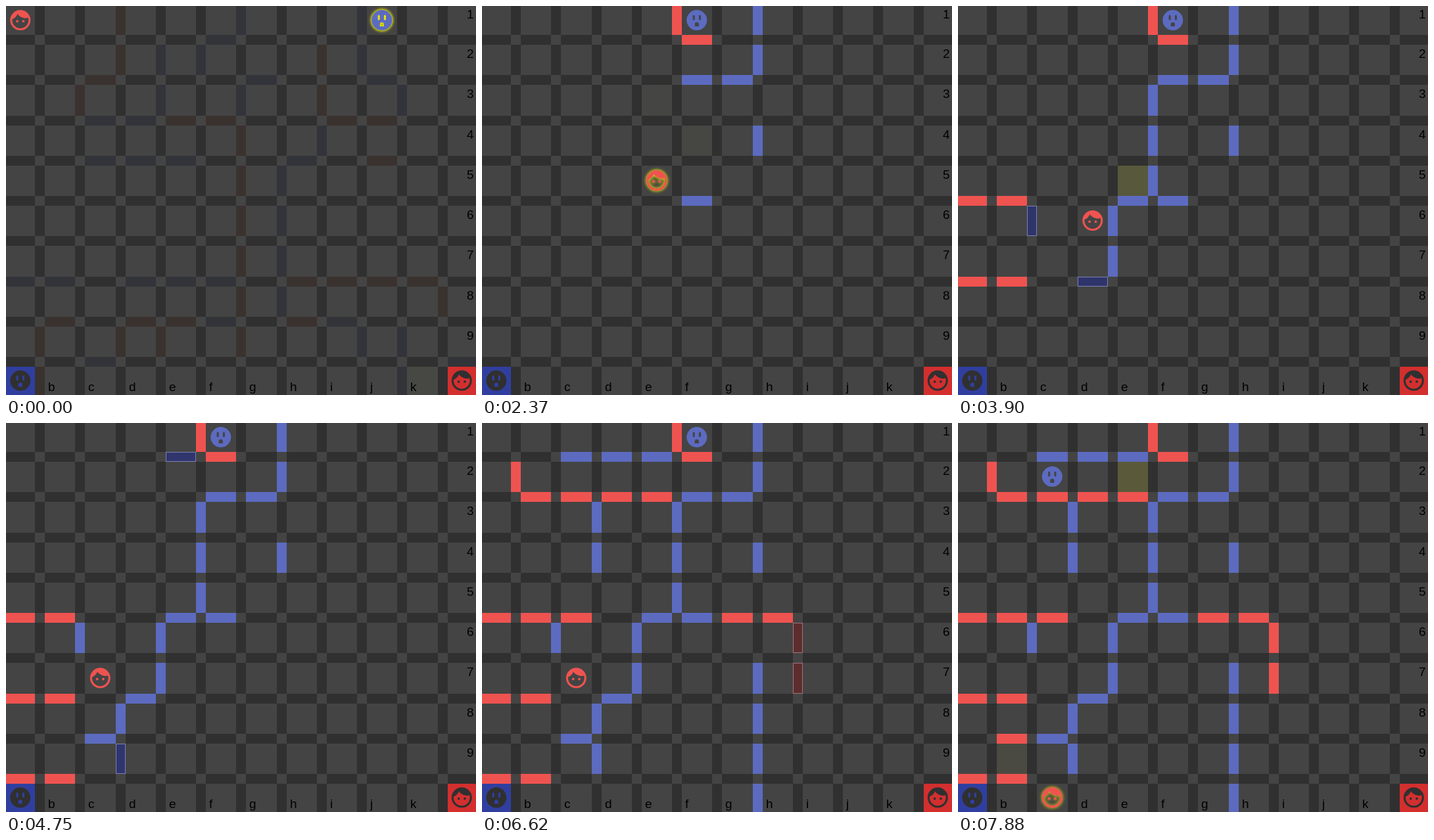
An HTML page with a canvas that plays this animation: 715x592 px, repeating every 8000 ms.

```html
<!DOCTYPE html>
<html>
<head>
<meta charset="utf-8">
<style>
html, body { margin: 0; width: 100%; height: 100%; overflow: hidden; background: #444; }
canvas { display: block; }
</style>
</head>
<body>
<canvas id="board" width="715" height="592"></canvas>
<script>
const ctx = document.getElementById('board').getContext('2d');
const LOOP = 8000, TURN = 210, FIRST = -10;
const COLS = 12, ROWS = 10;

// Turns alternate blue, red. "b2" is a move; "b2>" and "b2v" build a wall right of / below a cell.
const turns = `j1|b2|h1|d2|f1|e1> f1v|g1> g2>|e3|f2v g2v|f4|g4> f5v|e5|e3> e4>|a5v b5v|e5> e5v|
a7v b7v|d6> d7>|d6|b6> d7v|c7|c8> c8v|a9v b9v|c9> e1v|d2v e2v|c1v d1v|b2v c2v|c3> c4>|a2> c5v|
g7> g8>|g5v h5v|g9> g10>|h6> h7>|g2|b8|e2|b9 b8v|c2|c10`.split('|').map(s => s.trim().split(' '));

// Walls of the previous game, still fading at the start
const staleRed = `c1> c2> b3> h2> h3> f4> f5> f6> f7> f8> f9> k8> a9> a10> c9> d9> c2v e3v f3v i3v j3v j4v
h7v i7v j7v k7v b8v d8v e8v h8v`.split(/\s+/);
const staleBlue = `f1> d2> d3> e2> f3> i1> i2> j3> h4> g5> g6> g7> g8> i9> j9> j10> f1v g2v j2v c3v d3v
c4v d4v e4v h4v a7v b7v d7v e7v f7v f8v i8v c9v l9v`.split(/\s+/);

const sides = [
  { home: 'l1', bright: [92, 107, 192], dark: [47, 53, 107], edge: '150,155,205' },
  { home: 'a1', bright: [239, 83, 80], dark: [93, 45, 46], edge: '185,140,150' }
];

const outlet = new Path2D('M12 2a10 10 0 1 0 0 20a10 10 0 1 0 0-20z' +
  'M9 12c-.55 0-1-.45-1-1V8c0-.55.45-1 1-1s1 .45 1 1v3c0 .55-.45 1-1 1z' +
  'M15 12c-.55 0-1-.45-1-1V8c0-.55.45-1 1-1s1 .45 1 1v3c0 .55-.45 1-1 1z' +
  'M14 18h-4v-2a2 2 0 0 1 4 0z');
const face = new Path2D('M9 11.75a1.25 1.25 0 1 0 0 2.5a1.25 1.25 0 1 0 0-2.5z' +
  'M15 11.75a1.25 1.25 0 1 0 0 2.5a1.25 1.25 0 1 0 0-2.5z' +
  'M12 2a10 10 0 1 0 0 20a10 10 0 1 0 0-20z' +
  'M12 20c-4.41 0-8-3.59-8-8 0-.29.02-.58.05-.86 2.36-1.05 4.23-2.98 5.21-5.37' +
  'C11.07 8.33 14.05 10 17.42 10c.78 0 1.53-.09 2.25-.26.21.71.33 1.47.33 2.26 0 4.41-3.59 8-8 8z');
const icons = [outlet, face];

const clamp = v => Math.max(0, Math.min(1, v));
const rgb = c => `rgb(${c.map(Math.round)})`;
const mix = (a, b, p) => a.map((v, i) => v + (b[i] - v) * p);
const start = i => Math.max(0, Math.round(61.27 * i - 2.3));
const end = (i, count) => i === count - 1 ? start(i) + (count === COLS ? 43 : 43) : Math.round(61.27 * i + 44);

function cellBox(code) {
  const col = code.charCodeAt(0) - 97, row = parseInt(code.slice(1)) - 1;
  const x = start(col), y = start(row);
  return { x, y, w: end(col, COLS) - x, h: end(row, ROWS) - y, right: start(col + 1), below: start(row + 1) };
}

function wallBox(code) {
  const { x, y, w, h, right, below } = cellBox(code);
  return code.endsWith('>') ? [x + w, y, right - x - w, h] : [x, y + h, w, below - y - h];
}

function fill(color, box) {
  ctx.fillStyle = color;
  ctx.fillRect(...box);
}

function drawWall(code, side, age) {
  const box = wallBox(code);
  const shown = clamp((age - 65) / 45);
  if (!shown) return;
  const grow = 1 - (1 - clamp((age - 140) / 160)) ** 3;
  ctx.globalAlpha = shown;
  fill(rgb(mix(side.dark, side.bright, grow)), box);
  ctx.globalAlpha = 1;
  if (grow < 0.8) {
    ctx.strokeStyle = `rgba(${side.edge},${0.75 * shown * (1 - grow / 0.8)})`;
    ctx.lineWidth = 1;
    ctx.strokeRect(box[0] + 0.5, box[1] + 0.5, box[2] - 1, box[3] - 1);
  }
}

function drawIcon(code, icon, color, glow = 0) {
  const { x, y, w, h } = cellBox(code);
  ctx.save();
  ctx.translate(x + w / 2 - 0.2, y + h / 2 - 0.4);
  ctx.scale(1.55, 1.55);
  ctx.translate(-12, -12);
  ctx.fillStyle = color;
  if (glow > 0) {
    ctx.shadowColor = `rgba(255,255,0,${glow})`;
    ctx.shadowBlur = 5;
    ctx.fill(icon, 'evenodd');
  }
  ctx.fill(icon, 'evenodd');
  ctx.restore();
}

function highlight(code, amount) {
  const { x, y, w, h } = cellBox(code);
  fill(rgb([68 + amount, 68 + amount, 68 - amount * 0.4]), [x, y, w, h]);
}

function drawGrid() {
  fill('#444', [0, 0, 715, 592]);
  for (let col = 0; col < COLS; col++) {
    for (let row = 0; row < ROWS; row++) {
      const cell = String.fromCharCode(97 + col) + (row + 1);
      if (col < COLS - 1) fill('#303030', wallBox(cell + '>'));
      if (row < ROWS - 1) fill('#303030', wallBox(cell + 'v'));
    }
  }
}

function drawLabels(occupied) {
  ctx.fillStyle = '#000';
  ctx.font = '19px Arial, "Liberation Sans", sans-serif';
  ctx.textAlign = 'right';
  for (let row = 0; row < ROWS - 1; row++) ctx.fillText(row + 1, 711.5, start(row) + (row ? 20 : 19));
  ctx.textAlign = 'left';
  for (let col = 1; col < COLS - 1; col++) {
    const letter = String.fromCharCode(97 + col);
    if (!occupied.includes(letter + '10')) ctx.fillText(letter, start(col) + 5, 586);
  }
}

function draw(t) {
  drawGrid();
  if (t < 70) {
    staleRed.forEach(code => fill('#3a322f', wallBox(code)));
    staleBlue.forEach(code => fill('#32343a', wallBox(code)));
    highlight('k10', 3);
  }

  const pieces = sides.map(side => ({ cell: side.home, age: Infinity }));
  const walls = [];
  turns.forEach((actions, k) => {
    const age = t - FIRST - TURN * k;
    if (age < 0) return;
    const piece = pieces[k % 2];
    for (const code of actions) {
      if (/\d$/.test(code)) {
        const trail = 28 * Math.exp(-(((age - 270) / 120) ** 2));
        if (k && trail > 0.5) highlight(piece.cell, trail);
        piece.cell = code;
        piece.age = age;
      } else {
        walls.push([code, sides[k % 2], age]);
      }
    }
  });
  walls.forEach(wall => drawWall(...wall));

  const goals = [['a10', '#303f9f'], ['l10', '#d32f2f']];
  goals.forEach(([cell, color], i) => {
    const { x, y, w, h } = cellBox(cell);
    fill(color, [x, y, w, h]);
    drawIcon(cell, icons[i], '#303030');
  });
  drawLabels(pieces.map(p => p.cell));
  pieces.forEach((p, i) => drawIcon(p.cell, icons[i], rgb(sides[i].bright), clamp(1 - p.age / 250)));
}

function frame() {
  draw(performance.now() % LOOP);
  requestAnimationFrame(frame);
}
frame();
</script>
</body>
</html>
```
